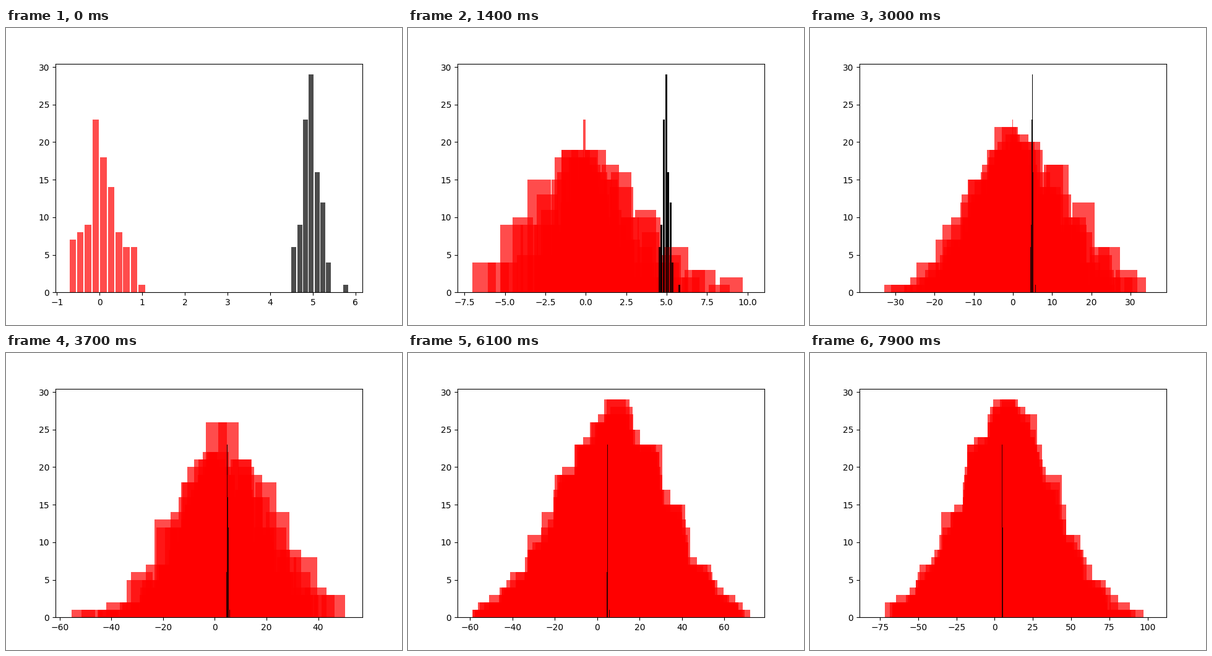
Recreate the animation shown at these times as a matplotlib script. Size 640x480 px, loop 8000 ms.

```python
import numpy as np
import matplotlib.pyplot as plt
from matplotlib.animation import FuncAnimation
from matplotlib.patches import Rectangle

STEPS, BINS, RWIDTH = 80, 10, .85
rng = np.random.default_rng(4)

# step, lowest and highest red value, then the bell: centre, left and
# right width, peak
KEYS = np.array([
    (0, -.709, 1.065, .1, .5, .7, 19),
    (14, -7.07, 10.18, -.5, 4.6, 6, 20),
    (22, -17.29, 21.35, -.5, 11, 12, 21),
    (37, -56.2, 51.7, 4, 26.5, 28.5, 26),
    (51, -59.35, 72.32, 10, 35, 31, 28),
    (63, -59.35, 72.32, 9, 38, 33, 28),
    (69, -59.35, 82.85, 9, 40, 36, 28),
    (79, -79.3, 103.2, 10, 45, 44, 28),
])


def state(k):
    """Key values at step k; the spread grows with the square of time."""
    return [np.interp(k**2, KEYS[:, 0]**2, col) for col in KEYS[:, 1:].T]


def bars(left, right, counts):
    """Bars (x, width, height) whose outer edges meet left and right."""
    pitch = (right - left) / (BINS - 1 + RWIDTH)
    return [(left + i * pitch, pitch * RWIDTH, n)
            for i, n in enumerate(counts) if n]


def noisy_bars(k):
    """One histogram of a slightly ragged, lopsided bell."""
    lo, hi, mid, wl, wr, peak = state(k)
    left = mid + (lo - mid) * rng.uniform(.86, 1)
    right = mid + (hi - mid) * rng.uniform(.86, 1)
    x = np.linspace(left, right, 2 * BINS + 1)[1::2] - mid
    bell = peak * np.exp(-(x / np.where(x < 0, wl, wr))**2)
    counts = np.rint(bell * rng.uniform(.72, 1.04, BINS))
    return bars(left, right, np.maximum(counts, 1))


first = bars(*state(0)[:2], [7, 8, 9, 23, 18, 14, 8, 6, 6, 1])
black = bars(4.497, 5.836, [6, 9, 23, 29, 16, 12, 4, 0, 0, 1])

fig, ax = plt.subplots(figsize=(6.4, 4.8), dpi=100)
ax.set_ylim(0, 29 * 1.05)


def add(shapes, color):
    return [ax.add_patch(Rectangle((x, 0), w, h, fc=color, ec="none",
                                   alpha=.7, visible=False))
            for x, w, h in shapes]


groups = [add(noisy_bars(k) if k else first, "red") + add(black, "black")
          for k in range(STEPS)]


def update(k):
    for i, group in enumerate(groups):
        for patch in group:
            patch.set_visible(i <= k)
    lo, hi = state(k)[:2]
    hi = max(hi, 5.836)
    pad = .05 * (hi - lo)
    ax.set_xlim(lo - pad, hi + pad)
    return []


anim = FuncAnimation(fig, update, frames=STEPS, interval=100,
                     init_func=lambda: [], repeat=True, repeat_delay=0)
plt.show()
```
